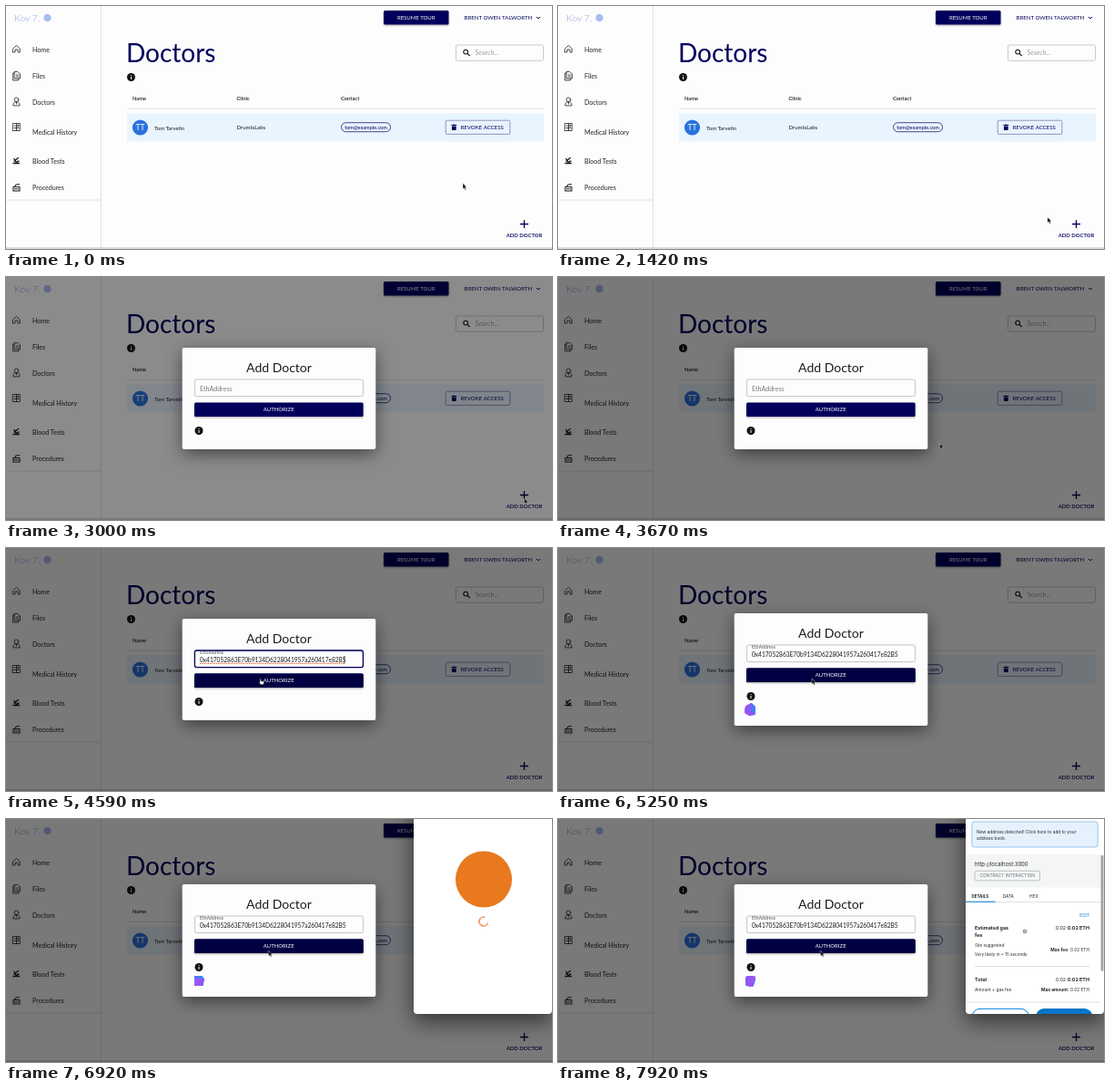
An HTML page that plays this animation: 600x268 px, repeating every 8 s.

```html
<!DOCTYPE html>
<html lang="en">
<head>
<meta charset="utf-8">
<title>Doctors</title>
<style>
  html, body { margin: 0; width: 100%; height: 100%; overflow: hidden; background: #fdfdfd; }
  #stage { position: absolute; left: 0; top: 0; width: 600px; height: 268px; overflow: hidden; }
  svg { display: block; }
  text { font-family: Lato, sans-serif; font-size: 6px; fill: #1c1c1c; white-space: pre; }
  .mid { text-anchor: middle; }
  .end { text-anchor: end; }
  .navy { fill: #00005c; }
  .white { fill: #fff; }
  .nav text { font-size: 7.1px; fill: #222; }
  .icons { fill: none; stroke: #222; stroke-width: .8; stroke-linejoin: round; stroke-linecap: round; }
  .head { font-weight: 600; font-size: 5.8px; }
  .rule { stroke: #d9d9d9; stroke-width: .8; }
  .raised { filter: drop-shadow(0 1px 1px rgba(0,0,0,.35)); }
  .sheet { fill: #fdfdfd; filter: drop-shadow(0 5px 9px rgba(0,0,0,.5)); }
  #popup { transform-origin: 524px 83px; }
  #window { filter: drop-shadow(0 8px 12px rgba(0,0,0,.6)); }
  #arc { transform-origin: 524px 113.5px; }
  #details text { font-family: Inter, sans-serif; font-size: 4.8px; fill: #24272a; }
  #details .big { font-size: 5.4px; }
  #details .bold { font-weight: 700; }
  #details .blue { fill: #037dd6; }
  #cube { position: absolute; left: 206.5px; top: 174px; width: 9px; height: 9px; perspective: 40px; }
  #cube div { position: absolute; width: 9px; height: 9px; }
  #cube > div { transform-style: preserve-3d; }
</style>
</head>
<body>
<div id="stage">
<svg width="600" height="268" viewBox="0 0 600 268">
  <defs>
    <g id="info">
      <circle r="4.5" fill="#111"/>
      <path d="M0-.6V2.4M0-2.4V-1.5" stroke="#fff"/>
    </g>
    <clipPath id="frame"><rect x="448" y="-44" width="152" height="259" rx="4"/></clipPath>
  </defs>

  <rect width="600" height="268" fill="#fdfdfd"/>
  <path class="rule" d="M104.5 0V267M0 214H104.5"/>
  <path d="M0 267H600" stroke="#b5b5b5"/>

  <text x="9" y="17" style="font-size:10.5px;font-weight:300;fill:#8c9be0">Kov 7.</text>
  <circle cx="45.5" cy="13" r="4.2" fill="#a9bdf0"/>

  <g class="nav">
    <text x="29" y="50.7">Home</text>
    <text x="29" y="79.7">Files</text>
    <text x="29" y="108.7">Doctors</text>
    <text x="29" y="141.5">Medical History</text>
    <text x="29" y="174">Blood Tests</text>
    <text x="29" y="203.3">Procedures</text>
  </g>
  <g class="icons">
    <path d="M7.7 47 11.5 43.5 15.3 47V51H13V48H10V51H7.7Z"/>
    <path d="M9.5 72.5H13L15.5 75V80H9.5ZM9.5 74H7.7V82H13.7V80M11 76H14M11 78H14"/>
    <circle cx="11.5" cy="103.3" r="2.3"/>
    <path d="M8 109.5V107.5Q9 105.7 11.5 105.8 14 105.7 15 107.5V109.5ZM11.5 106V108"/>
    <path d="M7.7 129.5H15.3V137.5H7.7ZM11.5 129.5V137.5M9 132H10.5M9 134.5H14M13.2 131V133.2M12.2 132H14.2"/>
    <path d="M8 173.5H14.5M9 171 13.5 167.5M9 168.5 11 172.5 14 171" stroke-width="1.4"/>
    <path d="M8 199.5H15V204H8ZM9.5 199.5 11 197 14.5 196.5M9.5 201.7H13.5" stroke-width="1.1"/>
  </g>

  <rect class="navy raised" x="415" y="5" width="71.5" height="15.5" rx="1.5"/>
  <text class="mid white" x="450.7" y="15">RESUME TOUR</text>
  <text class="navy" x="503.5" y="15" style="font-size:6.1px">BRENT OWEN TALWORTH</text>
  <path d="M583 12 585 14 587 12" fill="none" stroke="#00005c"/>

  <text class="navy" x="132" y="61.5" style="font-size:28px">Doctors</text>
  <use href="#info" x="137.5" y="78.5"/>

  <rect x="494.5" y="43" width="96" height="17.3" rx="2" fill="none" stroke="#c4c4c4" stroke-width=".9"/>
  <g fill="none" stroke="#111" stroke-width="1.1"><circle cx="505.2" cy="50.6" r="2.4"/><path d="M507 52.4 509.6 55"/></g>
  <text x="515.5" y="54" style="font-size:7.1px;fill:#9b9b9b">Search...</text>

  <text class="head" x="139" y="103.8">Name</text>
  <text class="head" x="253.5" y="103.8">Clinic</text>
  <text class="head" x="368" y="103.8">Contact</text>
  <path class="rule" d="M133 113.3H591"/>
  <rect x="133" y="118.5" width="458" height="31" fill="#e8f4fe"/>
  <circle cx="147.5" cy="134" r="8.6" fill="#2a72de"/>
  <text class="mid white" x="147.5" y="137" style="font-size:8.6px">TT</text>
  <text x="163" y="136.7">Tom Tarvelin</text>
  <text x="253.5" y="136">DrumloLabs</text>
  <rect x="368.5" y="128.7" width="54" height="10" rx="5" fill="none" stroke="#00005c" stroke-width=".7"/>
  <text class="navy mid" x="395.5" y="135.7" style="font-size:5.6px">tom@example.com</text>
  <rect x="483.2" y="126.2" width="70.6" height="15.2" rx="1.5" fill="none" stroke="#7d7db0" stroke-width=".8"/>
  <path class="navy" d="M489.4 131H491L491.6 130.4H493L493.6 131H495.2V132H489.4ZM489.9 132.5H494.7V136.2Q494.7 137 494 137H490.6Q489.9 137 489.9 136.2Z"/>
  <text class="navy" x="499.5" y="136" style="font-size:6.1px">REVOKE ACCESS</text>

  <rect id="hover" x="546.5" y="230.5" width="46.5" height="31.5" rx="2" fill="#f1f2f5"/>
  <path d="M565 240.5H574M569.5 236V245" stroke="#00005c" stroke-width="1.3"/>
  <text class="mid navy" x="569.5" y="255.3" style="font-weight:600;font-size:5.9px">ADD DOCTOR</text>

  <rect id="backdrop" width="600" height="268" opacity="0"/>

  <g id="modal" opacity="0">
    <g id="shift">
      <rect id="short" class="sheet" x="193.7" y="78" width="212.6" height="112" rx="2"/>
      <rect id="tall" class="sheet" x="193.7" y="78" width="212.6" height="124" rx="2"/>
      <text class="mid" x="300" y="104.5" style="font-size:14px">Add Doctor</text>
      <rect x="207.4" y="113" width="185" height="18.6" rx="2" fill="none" stroke="#bdbdbd" stroke-width=".9"/>
      <rect id="focus" x="207.4" y="113" width="185" height="18.6" rx="2" fill="none" stroke="#00005c" stroke-width="1.3"/>
      <text id="hint" x="213" y="126" style="font-size:7.1px;fill:#777">EthAddress</text>
      <text id="label" x="213" y="116.7" style="font-size:5.2px;fill:#555">EthAddress</text>
      <text id="value" x="213" y="125.7" style="font-size:6.6px">0x417052863E70b9134D6228041957a260417e82B5</text>
      <path id="spell" d="M213 127.4H371" stroke="#f0522d" stroke-width=".9" stroke-dasharray="1.2 .6"/>
      <path id="caret" d="M371.8 119V128" stroke="#222" stroke-width=".7"/>
      <rect class="navy raised" x="207" y="138.6" width="185.6" height="15.4" rx="1.5"/>
      <rect id="pressed" x="207" y="138.6" width="185.6" height="15.4" rx="1.5" fill="#000042"/>
      <text class="mid white" x="299.7" y="148.4">AUTHORIZE</text>
      <use href="#info" x="212" y="169.5"/>
    </g>
  </g>

  <g id="popup" opacity="0">
    <rect id="window" x="448" y="-44" width="152" height="259" rx="4" fill="#fff"/>
    <g id="lights">
      <circle cx="453.8" cy="-38.5" r="2.2" fill="#f2655a"/>
      <circle cx="462.6" cy="-38.5" r="2.2" fill="#f4b74b"/>
      <circle cx="471.4" cy="-38.5" r="2.2" fill="#b9c6a8"/>
    </g>
    <g id="loading">
      <circle cx="525" cy="66.5" r="31" fill="#e8791f"/>
      <path id="arc" d="M528.3 109.9A4.9 4.9 0 1 0 528.3 117.1" fill="none" stroke="#f0762c" stroke-width="1.4"/>
    </g>
    <g id="details" clip-path="url(#frame)">
      <rect x="454.8" y="3" width="138.4" height="28" rx="2.5" fill="#e5f1fc" stroke="#82b7ea" stroke-width=".8"/>
      <text x="460" y="15.5">New address detected! Click here to add to your</text>
      <text x="460" y="23.3">address book.</text>
      <rect x="448" y="39" width="152" height="36.5" fill="#f4f5f5"/>
      <text x="458" y="51.6" style="font-size:5.9px">http://localhost:3000</text>
      <rect x="458" y="57.3" width="71.5" height="10.6" rx="2" fill="none" stroke="#aeb3b8" stroke-width=".8"/>
      <text class="mid" x="493.8" y="64.3" style="fill:#6a737d">CONTRACT INTERACTION</text>
      <text class="bold" x="454.5" y="86.8" style="font-size:4.5px">DETAILS</text>
      <text x="488.7" y="86.8">DATA</text>
      <text x="518" y="86.8">HEX</text>
      <path class="rule" d="M448 91.6H600"/>
      <path d="M448 91.2H480.5" stroke="#037dd6" stroke-width="1.1"/>
      <text class="end blue" x="584" y="107.6">EDIT</text>
      <text class="big bold" x="458" y="122">Estimated gas</text>
      <text class="big bold" x="458" y="130.3">fee</text>
      <circle cx="513" cy="124" r="2.4" fill="#9aa0a6"/>
      <path d="M513 123.6V125.4M513 122.4V123" stroke="#fff" stroke-width=".6"/>
      <text class="big end" x="584" y="122">0.02 <tspan class="bold">0.02 ETH</tspan></text>
      <text x="458" y="141" style="font-style:italic;font-size:4.6px">Site suggested</text>
      <text x="458" y="151" style="font-size:4.6px">Very likely in &lt; 15 seconds</text>
      <text class="end" x="584" y="145.7"><tspan class="bold">Max fee:</tspan> 0.02 ETH</text>
      <path class="rule" d="M458 162.5H584"/>
      <text class="big bold" x="458" y="179">Total</text>
      <text class="big end" x="584" y="179">0.02 <tspan class="bold">0.02 ETH</tspan></text>
      <text x="458" y="189.6">Amount + gas fee</text>
      <text class="end" x="584" y="189.6"><tspan class="bold">Max amount:</tspan> 0.02 ETH</text>
      <path class="rule" d="M448 202H596"/>
      <rect x="455" y="209.3" width="62.5" height="18" rx="9" fill="none" stroke="#037dd6"/>
      <rect x="525" y="209" width="62.5" height="18" rx="9" fill="#0376c9"/>
      <rect x="596.6" y="40" width="2.8" height="128" rx="1.4" fill="#a2a2a2"/>
    </g>
  </g>

  <g id="cursor" stroke-linejoin="round">
    <path id="arrow" d="M0 0V6.2L1.4 5 2.4 7.3 3.5 6.8 2.5 4.6H4.4Z" stroke="#fff" stroke-width=".4"/>
    <path id="beam" d="M-1-1H1M0-1V6M-1 6H1" stroke="#111" stroke-width=".7"/>
    <path id="hand" d="M0 .4Q.7-.4 1.3.4V2.4L4 3Q4.8 3.3 4.6 4.4L4 6.8H1L-1.2 4Q-1 3 0 3.8Z" fill="#fff" stroke="#111" stroke-width=".7"/>
  </g>
</svg>
<div id="cube"><div></div></div>
</div>

<script>
const LOOP = 8000;
const $ = id => document.getElementById(id);
const timing = { duration: LOOP, iterations: Infinity };

// steps: [time in ms, properties, easing towards the next step]
function track(id, steps) {
  const frames = steps.map(([time, props, easing = 'linear']) =>
    ({ ...props, offset: time / LOOP, easing }));
  frames.unshift({ ...frames[0], offset: 0 });
  frames.push({ ...frames[frames.length - 1], offset: 1 });
  $(id).animate(frames, timing);
}

function show(id, from, to = LOOP) {
  const hard = (time, opacity) => [time, { opacity }, 'step-end'];
  const steps = [hard(0, from > 0 ? 0 : 1), hard(from, 1)];
  if (to < LOOP) steps.push(hard(to, 0));
  track(id, steps);
}

const FOCUS = 4000, PASTE = 4330, CLICK = 5090, GROW = 5170, POPUP = 5830, LOADED = 7250;

show('hover', 1760, 2920);
show('focus', FOCUS, CLICK);
show('hint', 0, FOCUS);
show('label', FOCUS);
show('value', PASTE);
show('spell', PASTE, CLICK);
show('caret', PASTE, CLICK);
show('pressed', 4480);
show('short', 0, GROW);
show('tall', GROW);
show('cube', GROW);
show('lights', POPUP, 6010);
show('loading', 6010, LOADED);
show('details', LOADED);
show('beam', 3900, 4450);
show('hand', 4450, CLICK);

track('arrow', [[0, { opacity: 1 }, 'step-end'], [3900, { opacity: 0 }, 'step-end'], [CLICK, { opacity: 1 }]]);
track('backdrop', [[2850, { opacity: 0 }], [3000, { opacity: .45 }], [3080, { opacity: .52 }]]);
track('modal', [[2850, { opacity: 0 }], [2995, { opacity: 1 }]]);
track('shift', [[0, { transform: 'translateY(0)' }, 'step-end'], [GROW, { transform: 'translateY(-6px)' }]]);

const zoom = (scale, opacity) => ({ transform: `scale(${scale})`, opacity });
track('popup', [
  [0, zoom(.605, 0), 'step-end'],
  [POPUP, zoom(.605, .8)],
  [5860, zoom(.62, .82)],
  [5930, zoom(.9, .95)],
  [6010, zoom(1, 1)]
]);
track('window', [[5860, { fill: '#50544f' }], [5940, { fill: '#fff' }]]);

const at = (x, y) => ({ transform: `translate(${x}px, ${y}px)` });
track('cursor', [
  [250, at(502, 195.5), 'ease-in-out'],
  [750, at(507, 190)],
  [920, at(507, 190), 'ease-in-out'],
  [1600, at(543, 240)],
  [1880, at(569.5, 244)],
  [3400, at(569.5, 244), 'ease-in-out'],
  [3950, at(262, 120)],
  [4370, at(262, 120), 'ease-in-out'],
  [4560, at(279, 144)],
  [5920, at(279, 144), 'ease-in-out'],
  [6350, at(288.5, 145)]
]);

$('arc').animate({ transform: ['rotate(0)', 'rotate(360deg)'] }, { duration: 1000, iterations: Infinity });

const cube = $('cube').firstElementChild;
const sides = ['Y(0', 'Y(90', 'Y(180', 'Y(270', 'X(90', 'X(270'];
sides.forEach((side, i) => {
  const face = cube.appendChild(document.createElement('div'));
  face.style.transform = `rotate${side}deg) translateZ(4.5px)`;
  face.style.background = i % 2
    ? 'linear-gradient(90deg, #2f8df5, #5b6cf4)'
    : 'linear-gradient(120deg, #7a5cf5, #b44cf0)';
});
cube.animate(
  { transform: ['rotateZ(8deg) rotateX(-12deg) rotateY(0)', 'rotateZ(8deg) rotateX(348deg) rotateY(360deg)'] },
  { duration: 2000, iterations: Infinity });
</script>
</body>
</html>
```
